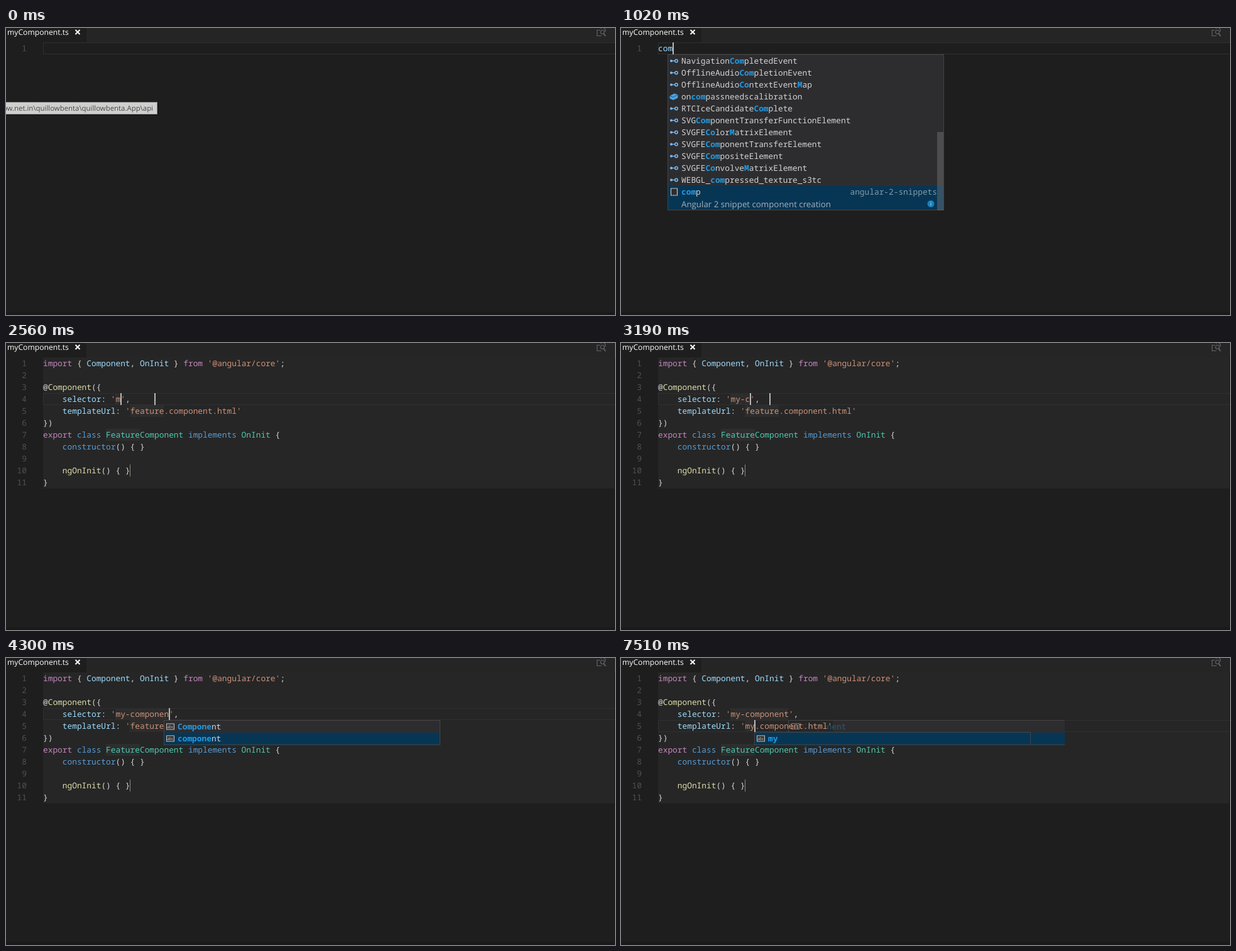
Animation of 969x458 px, one loop 8 s. Source, as an HTML page:

```html
<!DOCTYPE html>
<html lang="en">
<head>
<meta charset="utf-8">
<title>Code editor</title>
<style>
html, body { margin: 0; width: 100%; height: 100%; overflow: hidden; background: #1e1e1e; }
svg { display: block; width: 100%; height: 100%; }
text { white-space: pre; text-rendering: geometricPrecision; }
.mono { font: 500 12.83px "Noto Sans Mono", "DejaVu Sans Mono", monospace; fill: #d4d4d4; }
.ui { font-family: "Open Sans", "Noto Sans", sans-serif; }
.k { fill: #c586c0; } .b { fill: #569cd6; } .t { fill: #4ec9b0; } .v { fill: #9cdcfe; }
.s { fill: #ce9178; } .f { fill: #dcdcaa; } .p { fill: #d4d4d4; }
.hit { fill: #219ae2; font-weight: 700; }
.mono.num { font-weight: 400; fill: #505050; text-anchor: end; }
.mono.detail { font-weight: 400; fill: #8699a5; text-anchor: end; }
</style>
</head>
<body>
<svg viewBox="0 0 969 458" preserveAspectRatio="none">
  <rect width="969" height="458" fill="#1e1e1e"/>
  <rect x="128" width="841" height="23" fill="#252526"/>
  <rect y="454" width="969" height="4" fill="#19191a"/>
  <rect x="968" y="23" width="1" height="431" fill="#19191a"/>
  <text class="ui" x="2" y="11" font-size="12.15" font-weight="500" fill="#fff">myComponent.ts</text>
  <path d="M110.5 3l7 7m0-7l-7 7" stroke="#fff" stroke-width="2"/>
  <g fill="none" stroke="#656567" stroke-width="1.1">
    <path d="M945 3.5h-4.500v9h7M947 1.500v-2h4l2.500 2.500v4"/>
    <circle cx="949" cy="6.500" r="3"/>
    <path d="M951 9l3 4" stroke-width="1.8"/>
  </g>
  <g id="view"></g>
</svg>
<script>
const DURATION = 8000, LEFT = 59, CHAR = 7.698, ROW = 19;
const view = document.getElementById('view');

const colX = col => Math.floor(LEFT + col * CHAR);
const rowY = line => 23 + (line - 1) * ROW;
const rect = (x, y, w, h, fill, more = '') =>
  `<rect x="${x}" y="${y}" width="${w}" height="${h}" fill="${fill}" ${more}/>`;
const frame = (x, y, w, h, stroke, fill = 'none') =>
  rect(x + .5, y + .5, w - 1, h - 1, fill, `stroke="${stroke}"`);
const mono = (x, y, body, kind = '') => `<text class="mono ${kind}" x="${x}" y="${y}">${body}</text>`;
const tint = (color, body) => `<tspan fill="${color}">${body}</tspan>`;
const lineNumber = n => mono(33, rowY(n) + 14, n, 'num');
const caret = (line, col) => rect(colX(col), rowY(line), 2, ROW, '#b8b9b7');
const mark = (line, from, length, fill) =>
  rect(colX(from), rowY(line), Math.round(length * CHAR), ROW, fill);

// Each token is a colour class letter followed by its text.
const tokens = source => source.split('|')
  .map(t => `<tspan class="${t[0]}">${t.slice(1)}</tspan>`).join('');

const codeLines = ({ selector, file }) => [
  "kimport|p { |vComponent|p, |vOnInit|p } |kfrom|p |s'@angular/core'|p;",
  '',
  'p@|fComponent|p({',
  `p    |vselector|p: |s'${selector}'|p,`,
  `p    |vtemplateUrl|p: |s'${file}.component.html'`,
  'p})',
  'kexport|p |bclass|p |tFeatureComponent|p |bimplements|p |tOnInit|p {',
  'p    |bconstructor|p() { }',
  '',
  'p    |fngOnInit|p() { }',
  'p}'
];

// Highlights the longest prefix of the query, then its remaining letters in order.
function matchLabel(label, query) {
  const lower = label.toLowerCase(), hits = new Set();
  let size = query.length;
  while (size && !lower.includes(query.slice(0, size))) size--;
  let at = lower.indexOf(query.slice(0, size));
  for (let i = 0; i < size; i++) hits.add(at++);
  for (const letter of query.slice(size)) {
    const next = lower.indexOf(letter, at);
    if (next < 0) break;
    hits.add(next);
    at = next + 1;
  }
  return [...label].map((c, i) => hits.has(i) ? `<tspan class="hit">${c}</tspan>` : c).join('');
}

// Icons are centred on the given point.
const icons = {
  i: '<path d="M-3 0H2" stroke="#75beff" stroke-width="1.3"/><circle cx="-4" r="2" fill="#75beff"/>' +
     '<circle cx="4" r="2.200" fill="none" stroke="#75beff" stroke-width="1.500"/>',
  c: '<path d="M-6.500 -1L1 -5L6.500 -3V2L-1 5.500L-6.500 3Z" fill="#4aa5e8"/>' +
     '<path d="M-6 -1L-1 1L6 -3" stroke="#1f4f78" fill="none"/>',
  a: '<rect x="-5.500" y="-4.500" width="12" height="9" fill="#303030" stroke="#c5c5c5"/>' +
     '<text class="ui" x=".5" y="2.500" font-size="6.500" text-anchor="middle" fill="#d4d4d4">abc</text>',
  s: '<path d="M-4.500 5V-5.500H5.500V5" fill="#2d2d30" stroke="#d0c4b8" stroke-width="1.200"/>' +
     '<path d="M-5 5.500H6" stroke="#d0c4b8" stroke-width="1.500" stroke-dasharray="2 1"/>'
};
const icon = (kind, x, y) => `<g transform="translate(${x} ${y})">${icons[kind]}</g>`;

function popup({ line, col, items, query, thumb }) {
  const x = colX(col), y = rowY(line + 1), last = items.length - 1;
  const detailed = items[last][0] === 's';
  const height = (items.length + detailed) * ROW + 2;
  let out = frame(x, y, 440, height, '#454545', '#2d2d30');
  items.forEach((item, i) => {
    const top = y + 1 + i * ROW, base = top + 14;
    if (i === last) out += rect(x + 1, top, 438, ROW * (1 + detailed), '#073655');
    out += icon(item[0], x + 10, top + 9.5) + mono(x + 22, base, matchLabel(item.slice(1), query));
    if (item[0] === 's') out +=
      mono(x + 429, base, 'angular-2-snippets', 'detail') +
      `<text class="ui" x="${x + 22}" y="${base + 20}" font-size="13.3" fill="#a3b1bb">Angular 2 snippet component creation</text>` +
      `<circle cx="${x + 419}" cy="${top + 28.5}" r="5.5" fill="#1b80b8"/>` +
      `<path d="M${x + 419} ${top + 25}v1.5m0 1v4" stroke="#8fc6e8" stroke-width="1.2"/>`;
  });
  if (thumb) out += rect(x + 429, y + thumb, 10, height - thumb, '#797979', 'opacity=".42"');
  return out;
}

// Remains of the suggestion list that are only partly repainted.
function staleList({ stale, file }) {
  const x = 267, y = 99, repainted = stale === 'open' ? 372 : 337;
  const label = stale === 'open' ? tint('#2583ba', 'Component')
    : tint('#4a4a4a', 'Compo') + tint('#2583ba', 'nent');
  return popup({ line: 4, col: 27, items: WORDS, query: 'component' }) +
    (file === 'my' ? rect(x, 119, 439, 19, '#073655') : '') +
    rect(x + 1, y + 1, repainted - x - 1, 17, '#262626') +
    rect(repainted, y + 1, 706 - repainted, 18, '#2d2d30') +
    `<g opacity=".5">${icon('a', x + 10, 109)}${mono(x + 22, 114, label)}</g>`;
}

const tooltip = opacity => `<g opacity="${opacity}">` +
  rect(0, 121, 243, 19, '#000', 'opacity=".25"') + frame(-5, 118, 246, 20, '#858585', '#cfd0ce') +
  '<text class="ui" x="234" y="132" font-size="11.4" text-anchor="end" fill="#484848">' +
  'ow.net.in\\quillowbenta\\quillowbenta.App\\api</text></g>';

function codeView(s) {
  let out = rect(LEFT, 23, 909, 11 * ROW, '#262626');
  if (s.current) out += frame(LEFT, rowY(s.current), 920, ROW, '#303031');
  out += mark(4, 15, s.selector.length, s.selecting === 4 ? '#315580' : '#2d2d2d');
  if (s.selecting === 4) out += mark(4, 4, 8, '#3a4148');
  out += mark(5, 18, s.file.length, s.selecting === 5 ? '#315580' : '#2d2d2d');
  out += mark(7, 13, 7, s.selecting === 5 ? '#424b4d' : '#2d2e2e');
  if (s.stale) out += staleList(s);
  codeLines(s).forEach((line, i) => {
    out += lineNumber(i + 1);
    if (line) out += mono(LEFT, rowY(i + 1) + 14, tokens(line));
  });
  out += rect(s.endMark, rowY(10), 1, ROW, '#8c8a80');
  if (s.oldCaret) out += caret(4, 23);
  return out;
}

function draw(s) {
  let out = s.selector ? codeView(s)
    : frame(LEFT, 23, 920, ROW, '#303031') + lineNumber(1) + mono(LEFT, 37, tokens('v' + s.typed));
  if (s.caret) out += caret(...s.caret);
  if (s.popup) out += popup(s.popup);
  if (s.tip) out += tooltip(s.tip);
  view.innerHTML = out;
}

const WORDS = ['aComponent', 'acomponent'], SNIPPET = 'scomp';
const API = ['iNavigationCompletedEvent', 'iOfflineAudioCompletionEvent', 'iOfflineAudioContextEventMap',
  'concompassneedscalibration', 'iRTCIceCandidateComplete', 'iSVGComponentTransferFunctionElement',
  'iSVGFEColorMatrixElement', 'iSVGFEComponentTransferElement', 'iSVGFECompositeElement',
  'iSVGFEConvolveMatrixElement', 'iWEBGL_compressed_texture_s3tc', SNIPPET];
const API_NARROW = ['iCompositionEvent', 'cgetComputedStyle', ...API.filter(n => !n.includes('Matrix'))];

const list = (line, col, items, query, thumb) => ({ popup: { line, col, items, query, thumb } });
const api = (query, items = API) => list(1, query.length, items, query, 124);
const typeTop = typed => ({ typed, caret: [1, typed.length] });
const typeSelector = selector => ({ selector, caret: [4, 15 + selector.length] });
const words = (query, items = WORDS) => list(4, 18 + query.length, items, query);

// Each step changes part of the state from its time on.
const steps = [
  [0, { typed: '', tip: 1 }],
  [70, { tip: .65 }],
  [150, { tip: .3, caret: [1, 0] }],
  [240, { tip: 0 }],
  [610, typeTop('c')],
  [690, api('c')],
  [770, typeTop('co')],
  [850, api('c')],
  [930, api('co')],
  [1020, { ...typeTop('com'), popup: { ...api('com').popup, col: 2 } }],
  [1090, api('com')],
  [1240, typeTop('comp')],
  [1330, api('comp', API_NARROW)],
  [1640, { selector: 'selector', file: 'feature', selecting: 4, caret: [4, 23], popup: null, endMark: 198 }],
  [1870, { endMark: 197 }],
  [2490, { ...typeSelector('m'), selecting: 0, current: 4, oldCaret: true }],
  [2570, list(4, 16, ['aimplements', 'aimport'], 'm')],
  [2640, { ...typeSelector('my'), popup: null }],
  [2860, typeSelector('my-')],
  [3190, typeSelector('my-c')],
  [3270, words('c', ['aclass', ...WORDS, 'aconst', 'aconstructor', 'acore', SNIPPET])],
  [3340, { ...typeSelector('my-co'), ...words('co', [...WORDS, 'acore', SNIPPET]) }],
  [3490, { ...typeSelector('my-com'), ...words('com', [...WORDS, SNIPPET]) }],
  [3590, { ...typeSelector('my-comp'), ...words('comp', [...WORDS, SNIPPET]) }],
  [3740, { ...typeSelector('my-compo'), oldCaret: false }],
  [3820, words('compo')],
  [3890, typeSelector('my-compon')],
  [3970, words('compon')],
  [4130, typeSelector('my-compone')],
  [4210, words('compone')],
  [4290, typeSelector('my-componen')],
  [4370, words('componen')],
  [4450, typeSelector('my-component')],
  [4530, words('component')],
  [5000, { popup: null, stale: 'open', current: 0 }],
  [5070, { caret: null }],
  [5600, { selecting: 5, caret: [5, 25] }],
  [6880, { file: 'm', selecting: 0, current: 5, caret: [5, 19], stale: 'covered' }],
  [6960, { file: 'my', caret: null, ...list(5, 20, ['amy'], 'my') }],
  [7510, { caret: [5, 20] }]
];

let state = {};
const scenes = steps.map(([time, change]) => ({ time, state: state = { ...state, ...change } }));

let shown = null;
function tick() {
  const time = performance.now() % DURATION;
  const scene = scenes.findLast(s => s.time <= time);
  if (scene !== shown) draw((shown = scene).state);
  requestAnimationFrame(tick);
}
tick();
</script>
</body>
</html>
```
